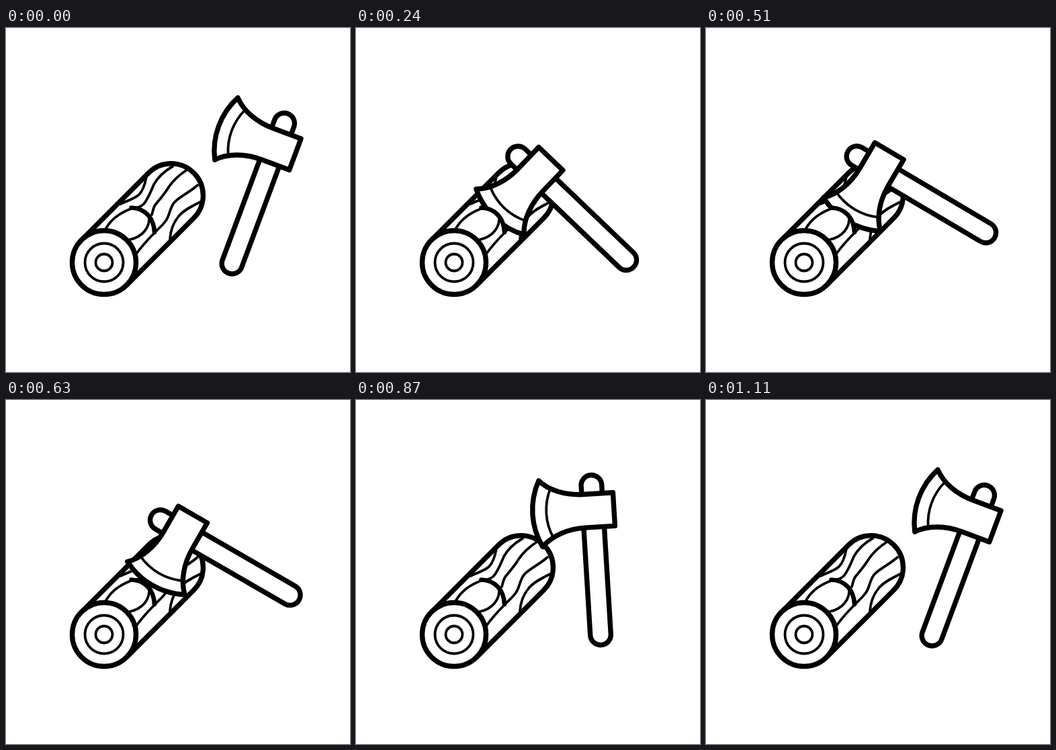
Recreate the animation shown at these times as an HTML page. Size 512 px wide and 512 px high, loop 1.26 s.

```html
<!DOCTYPE html>
<html lang="en">
<head>
<meta charset="utf-8">
<title>Axe and log</title>
<style>
  html, body { margin: 0; height: 100%; overflow: hidden; background: #fff; }
  svg { display: block; width: 100vw; height: 100vh; }
  .bold { fill: #fff; stroke: #000; stroke-width: 7.4; stroke-linecap: round; stroke-linejoin: round; }
  .fine { fill: none; stroke: #000; stroke-width: 3.8; stroke-linecap: round; stroke-linejoin: round; }
</style>
</head>
<body>
<svg viewBox="0 0 512 512">
  <clipPath id="outsideCut">
    <path clip-rule="evenodd" d="M0 0H512V512H0Z M186.5 267.5C207 268 220 283 221 304L121 404 86 368Z"/>
  </clipPath>

  <g id="log">
    <path class="bold" d="M112.5 315.5L212.3 215.7A47.5 47.5 0 0 1 279.5 282.9L179.7 382.7"/>
    <g class="fine">
      <path d="M209 221C207 232 204 242 198 248C190 255 180 257 170 262"/>
      <path d="M248 206C236 213 226 222 220 233C215 245 211 255 205 262C200 267 193 268 186 269C170 275 157 284 149 298"/>
      <path d="M268 212C256 220 248 228 242 237C236 247 229 255 223 262C219 267 219 272 217 278"/>
      <path d="M285 234C274 244 260 250 251 259C243 268 244 280 237 288C232 295 226 299 220 306C211 315 202 325 194 336"/>
      <path d="M289 259C277 265 265 271 258 279C250 288 245 300 244 314"/>
      <path d="M213 279C215 297 203 311 184 315"/>
    </g>
    <circle class="bold" cx="146" cy="349" r="47.5"/>
    <circle class="fine" cx="146" cy="349" r="28.5"/>
    <circle class="fine" cx="146" cy="349" r="12.5"/>
  </g>

  <g clip-path="url(#outsideCut)">
    <g id="axe">
      <rect class="bold" x="-15.3" y="-126.7" width="30.6" height="253.4" rx="15.3"/>
      <path class="bold" d="M-78 -123C-63 -107 -38 -98.7 -13 -98.7H31.3V-49H-13C-38 -49 -63 -40.5 -78 -24.5A107 107 0 0 1 -78 -123Z"/>
      <path class="fine" d="M-61.5 -110A86 86 0 0 0 -61.5 -37.5"/>
    </g>
  </g>
  <path class="bold" style="fill:none;stroke-width:6.6" d="M186.5 267.5C207 268 220 283 221 304"/>
  <path class="fine" id="chips"/>
</svg>
<script>
const LOOP = 1260, STEP = 30;
const axe = document.getElementById('axe');
const chips = document.getElementById('chips');

// time, centre x, centre y, angle
const keys = [
  [0, 375.3, 246.3, 20.4],
  [90, 321.7, 268.2, -46.3],
  [300, 321.7, 268.2, -46.3],
  [390, 320.3, 263, -49.8],
  [630, 326.3, 234.5, -60],
  [750, 341.5, 234, -37.6],
  [870, 357.2, 238.2, -3.5],
  [1110, 375.3, 246.3, 20.4]
];

const rate = (i, k) => (keys[i + 1][k] - keys[i][k]) / (keys[i + 1][0] - keys[i][0]);

function slope(i, k) {
  if (i === 0 || i === keys.length - 1) return 0;
  const a = rate(i - 1, k), b = rate(i, k);
  if (a * b === 0) return 0;
  const before = keys[i][0] - keys[i - 1][0], after = keys[i + 1][0] - keys[i][0];
  return (a * after + b * before) / (before + after);
}

// Cubic Hermite curve through the keys
function value(t, k) {
  const last = keys.length - 1;
  if (t >= keys[last][0]) return keys[last][k];
  const i = keys.findIndex(key => key[0] > t) - 1;
  const span = keys[i + 1][0] - keys[i][0], u = (t - keys[i][0]) / span;
  const ease = u * u * (3 - 2 * u);
  return keys[i][k] + (keys[i + 1][k] - keys[i][k]) * ease
    + span * (slope(i, k) * u * (1 - u) ** 2 - slope(i + 1, k) * u * u * (1 - u));
}

function chipPath(t) {
  const p = (t - 70) / 170;
  if (p <= 0 || p >= 1) return '';
  const tail = 14 + 28 * p * p, head = 14 + 28 * p * (2 - p);
  return [177, 225, 281].map(deg => {
    const a = deg * Math.PI / 180;
    const at = r => `${186 + r * Math.cos(a)} ${267 + r * Math.sin(a)}`;
    return `M${at(tail)}L${at(head)}`;
  }).join('');
}

function draw(now) {
  const t = Math.floor(now % LOOP / STEP) * STEP;
  axe.setAttribute('transform', `translate(${value(t, 1)} ${value(t, 2)}) rotate(${value(t, 3)})`);
  chips.setAttribute('d', chipPath(t));
  requestAnimationFrame(draw);
}
draw(0);
</script>
</body>
</html>
```
